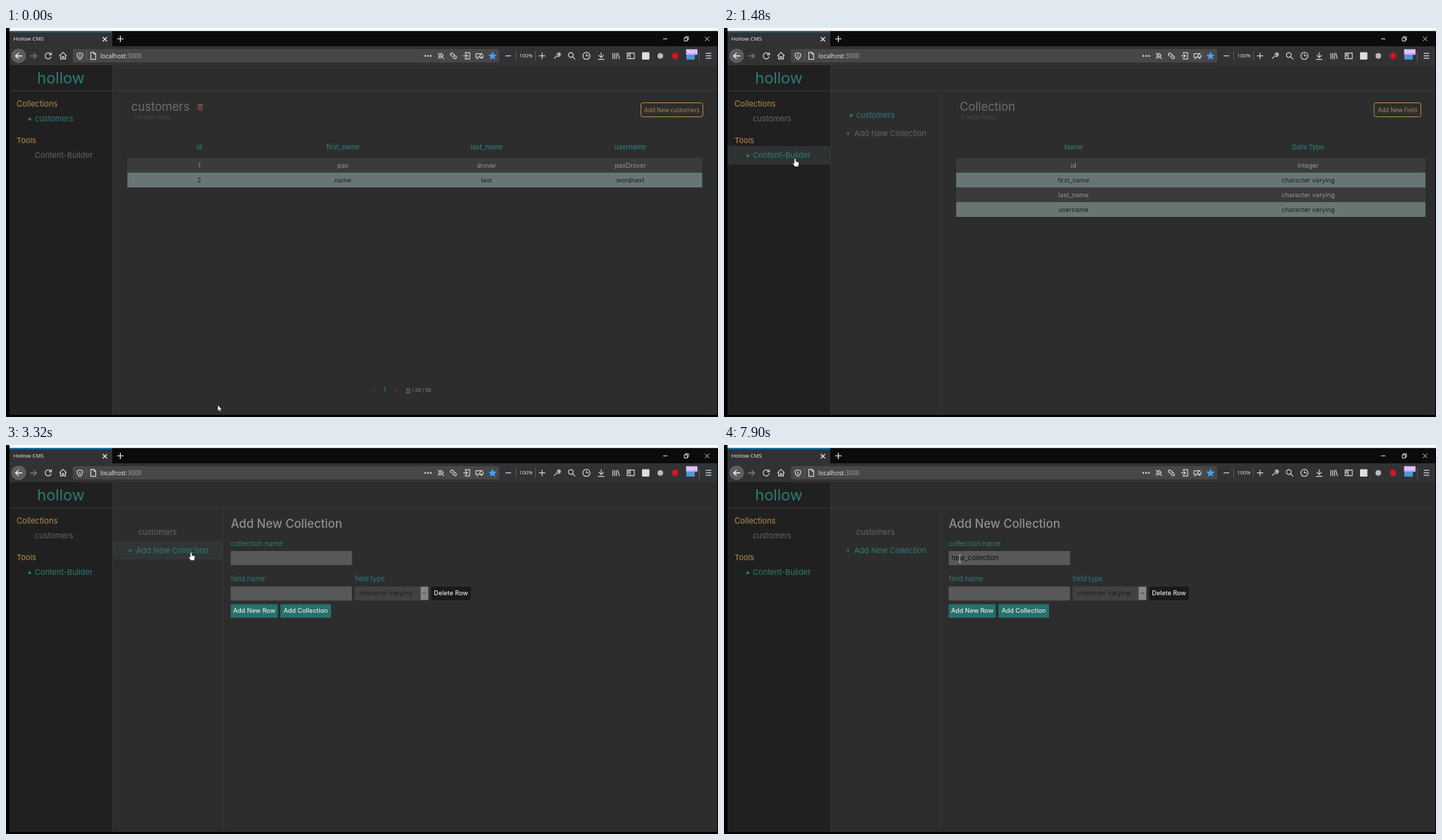
An HTML page with a canvas that plays this animation: 1012x554 px, repeating every 8000 ms.

```html
<!DOCTYPE html>
<html lang="en">
<head>
<meta charset="utf-8">
<title>Hollow CMS</title>
<style>
  html, body { margin: 0; height: 100%; overflow: hidden; background: #000; }
  canvas { display: block; }
</style>
</head>
<body>
<canvas id="stage" width="1012" height="554"></canvas>
<script>
const ctx = document.getElementById('stage').getContext('2d');
const LOOP = 8000;
const PAGE = 'Inter, sans-serif';
const CHROME = '"Open Sans", sans-serif';
const TEAL = '#2b7d75', ORANGE = '#b98a4c', GREY = '#616665', LINE = '#383838';

// time, x, y, hover strength
const cursorSteps = [
  [0, 301, 537], [210, 92, 129], [410, 97, 156], [500, 100, 172], [600, 102, 185],
  [1140, 101, 186], [1780, 104, 184], [1870, 118, 176], [1960, 140, 164],
  [2060, 168, 150, .1], [2150, 196, 138, .1], [2240, 220, 138, .1], [2340, 238, 143, .2],
  [2430, 249, 148, .4], [2540, 253, 140], [2660, 256, 139], [2970, 260, 148],
  [3040, 263, 153], [4130, 290, 157], [4190, 324, 160], [4250, 335, 162]
];
// time, number of typed letters
const NAME = 'new_collection';
const typingSteps = [
  [0, 0], [5120, 1], [5200, 2], [5280, 3], [5590, 4], [5920, 5], [6030, 6],
  [6180, 7], [6460, 8], [6580, 10], [6830, 11], [6940, 13], [7080, 14]
];
const BUILDER_AT = 1380, FORM_AT = 3320;

const stepAt = (steps, time) => steps.filter(step => step[0] <= time).pop();

function rect(x, y, w, h, color, radius = 0) {
  ctx.fillStyle = color;
  ctx.beginPath();
  ctx.roundRect(x, y, w, h, radius);
  ctx.fill();
}

function circle(x, y, r, color) {
  ctx.fillStyle = color;
  ctx.beginPath();
  ctx.arc(x, y, r, 0, Math.PI * 2);
  ctx.fill();
}

function text(str, x, y, size, color, { align = 'left', weight = 400, font = PAGE } = {}) {
  ctx.font = `${weight} ${size}px ${font}`;
  ctx.textAlign = align;
  ctx.textBaseline = 'middle';
  ctx.fillStyle = color;
  ctx.fillText(str, x, y);
}

const centered = (str, x, y, size, color, weight = 400, font = PAGE) =>
  text(str, x, y, size, color, { align: 'center', weight, font });

function shape(path, x, y, { stroke, fill, width = 1.2 }) {
  const outline = new Path2D(path);
  ctx.save();
  ctx.translate(x, y);
  ctx.lineJoin = 'round';
  if (fill) { ctx.fillStyle = fill; ctx.fill(outline); }
  if (stroke) { ctx.strokeStyle = stroke; ctx.lineWidth = width; ctx.stroke(outline); }
  ctx.restore();
}

const icon = (path, x, y = 39.7, stroke = '#d4d4d5', width = 1.2) => shape(path, x, y, { stroke, width });

const CROSS = 'M-3 -3L3 3M3 -3L-3 3';
const PLUS = 'M-4.5 0H4.5M0 -4.5V4.5';
const toolbarIcons = [
  [60, 'M3.5 -2.5A4.3 4.3 0 1 0 4.2 1M4.5 -5V-1.5H1'],
  [81, 'M-5 0L0 -5L5 0M-3.5 -1V4.5H-1V1H1V4.5H3.5V-1'],
  [105, 'M0 -4.5L4 -3Q4 3 0 5Q-4 3 -4 -3ZM0 -2V2.5'],
  [124, 'M-3.5 -5H1L3.5 -2.5V5H-3.5ZM1 -5V-2.5H3.5'],
  [618, 'M-3.5 -.5L.5 3.5M-1.5 1.5L-4 4M-2 -1L.5 -3.5L3.5 -.5L1 2M-4 -4L4.5 4.5'],
  [636, 'M-1 1L-4 -1Q-5 -4 -2 -4L1 -2Q2 0 0 1M1 -1L4 1Q5 4 2 4L-1 2'],
  [655, 'M-2 -2V-4.5H4V4.5H-2V2M-5 0H1M-1 -2L1 0L-1 2'],
  [673, 'M-5 -3H4M5 -2V2H1M-5 -3V2H-3M-4 5L4 -4M-1 1L4 4'],
  [714, 'M-4 0H4'],
  [762, PLUS],
  [783, 'M-4 4L1 -1M0 -2Q1 -5 4 -4L2 -2L3 -1L5 -3Q5 1 1 1'],
  [804, 'M2.2 -1.2A3.4 3.4 0 1 1 -4.6 -1.2A3.4 3.4 0 1 1 2.2 -1.2M1.2 1.2L5 5'],
  [825, 'M5 0A5 5 0 1 1 -5 0A5 5 0 1 1 5 0M0 -3V0H3'],
  [846, 'M0 -5V2M-3.5 -1L0 2.5L3.5 -1M-4.5 5H4.5'],
  [867, 'M-4.5 -4V4.5M-1.8 -4V4.5M.8 -4V4.5M2.5 -4L5 4.5'],
  [888, 'M-5 -4H5V4H-5ZM-1 -4V4M-4 -2H-2M-4 0H-2'],
  [998.5, 'M-4 -3.5H4M-4 0H4M-4 3.5H4']
];

function drawBrowser() {
  rect(0, 0, 1012, 554, '#000');
  rect(5, 0, 1007, 4.4, '#fff');
  rect(5, 4.4, 1006, 21.6, '#0b0b0c');
  rect(5, 26, 1006, 27, '#323234');
  rect(5, 5, 146, 21, '#323234');
  rect(5, 4.4, 146, 1.6, '#0a84c8');
  text('Hollow CMS', 10.5, 15.7, 7.8, '#f0f0f0', { font: CHROME });
  icon(CROSS, 140.5, 16, '#eee');
  icon(PLUS, 162.5, 15.5, '#eee');
  icon('M-3 0H3', 937, 15.5, '#ddd', 1);
  icon('M-3 -1.5H1.5V3H-3ZM-1.5 -1.5V-3H3V1.5H1.5', 967, 15.5, '#ddd', 1);
  icon(CROSS, 996.5, 15.5, '#ddd', 1);

  rect(95, 30, 606, 19, '#474749', 2);
  circle(18, 39.7, 10.4, '#5e5e60');
  icon('M5 0H-4M0 -4L-4.5 0L0 4', 18, 39.7, '#eee', 1.4);
  icon('M-5 0H4M0 -4L4.5 0L0 4', 39, 39.7, '#77777a', 1.4);
  for (const [x, path] of toolbarIcons) icon(path, x);
  for (const x of [114, 724, 752, 985]) rect(x, 33, 1, x === 985 ? 16 : 13, '#5a5a5c');
  for (const dx of [-4, 0, 4]) circle(600 + dx, 39.7, 1.3, '#d4d4d5');
  shape('M0 -6L1.7 -2L6 -1.7L2.7 1.2L3.7 5.3L0 3L-3.7 5.3L-2.7 1.2L-6 -1.7L-1.7 -2Z', 691.5, 39.7, { fill: '#45a1ff' });
  text('localhost', 134, 40.3, 8.7, '#f0f0f0', { font: CHROME });
  const hostWidth = ctx.measureText('localhost').width;
  text(':3000', 134 + hostWidth, 40.3, 8.7, '#a9a9ab', { font: CHROME });
  centered('100%', 739, 39.7, 7.5, '#e4e4e4', 400, CHROME);

  rect(904, 34.5, 10.5, 10.5, '#dededf', 1);
  circle(930, 39.7, 4, '#b9b9bb');
  circle(951, 39.7, 4.6, '#d3141f');
  rect(967, 36, 12, 9, '#4897dd');
  rect(966.5, 30, 16.5, 8.3, '#c3a2f4', 1);
  centered('9am', 974.7, 34, 7, '#fff', 600, CHROME);

  rect(5, 53, 146, 498, '#202020');
  rect(151, 53, 860, 498, '#2d2d2d');
}

function drawLink(label, x, y, active, dotted = true) {
  text(label, x, y, 11, active ? TEAL : GREY);
  if (active && dotted) circle(x - 7.3, y, 2.1, TEAL);
}

function hoveredRow(x, y, builder) {
  const within = (top, bottom) => y >= top && y < bottom;
  if (x < 151) {
    if (within(116, 142)) return [5, 116, 146, 26];
    if (within(168, 195)) return [5, 168, 146, 26.5];
  } else if (builder && x < 308) {
    if (within(111, 137)) return [152, 111, 156, 26];
    if (within(137, 163)) return [152, 137, 156, 26];
  }
  return null;
}

function drawSidebar(builder) {
  rect(5, 89, 1006, 1, LINE);
  rect(151, 53, 1, 498, '#343434');
  centered('hollow', 78, 72, 22, TEAL);
  text('Collections', 15, 108.6, 11.1, ORANGE);
  drawLink('customers', 41, 129.8, !builder);
  text('Tools', 15, 161, 11, ORANGE);
  drawLink('Content-Builder', 41, 182, builder);
}

function drawTable(left, width, head, rows) {
  const column = width / head.length;
  const center = index => left + column * (index + .5);
  head.forEach((label, i) => centered(label, center(i), 170, 9.4, TEAL, 500));
  rows.forEach((cells, r) => {
    const top = 185 + r * 21;
    rect(left, top, width, 21, r % 2 ? '#677674' : '#3b3b3b');
    cells.forEach((cell, i) => centered(cell, center(i), top + 11.3, 9.1, r % 2 ? '#1c1f1f' : '#929897'));
  });
}

function drawTitle(title, note, x) {
  text(title, x, 113, 16.7, '#6c706f');
  text(note, x + 2, 127.3, 7.6, '#484b4b');
}

function drawOutlineButton(label, left) {
  ctx.strokeStyle = ORANGE;
  ctx.lineWidth = 1;
  ctx.beginPath();
  ctx.roundRect(left, 106.5, 990.5 - left, 20, 3);
  ctx.stroke();
  centered(label, (left + 990.5) / 2, 117.5, 8.4, ORANGE, 400, CHROME);
}

function drawEntries() {
  drawTitle('customers', '2 entries found', 178);
  shape('M-3 -2.5H3L2.5 4H-2.5ZM-3.5 -3.5H3.5M-1 -4H1M-1 -1V2.5M1 -1V2.5', 276, 113, { stroke: '#a34d4d', width: 1 });
  drawOutlineButton('Add New customers', 902.5);
  drawTable(172.5, 817, ['id', 'first_name', 'last_name', 'username'], [
    ['1', 'pax', 'drover', 'paxDrover'],
    ['2', 'name', 'last', 'wordnext']
  ]);
  icon('M-2 -2.5V2.5M2 -2.5L-1 0L2 2.5', 523, 516, '#702070', 1);
  icon('M2 -2.5V2.5M-2 -2.5L1 0L-2 2.5', 552.5, 516, '#702070', 1);
  centered('1', 538, 515, 9, TEAL, 500);
  text('10 / 20 / 50', 568, 516, 6.8, '#8b8f8e');
  rect(568, 519, 6.5, .8, '#8b8f8e');
}

function drawFields() {
  drawTitle('Collection', '3 fields found', 335);
  drawOutlineButton('Add New Field', 924);
  drawTable(330, 667, ['Name', 'Data Type'], [
    ['id', 'integer'],
    ['first_name', 'character varying'],
    ['last_name', 'character varying'],
    ['username', 'character varying']
  ]);
}

function drawButton(label, left, top, width, color) {
  rect(left, top, width, 19.3, color, 1);
  centered(label, left + width / 2, top + 9.8, 9, '#e6e6e6', 500);
}

function drawForm(time) {
  text('Add New Collection', 319.5, 113, 16.8, '#8f8f8f', { weight: 500 });
  text('collection name', 319.5, 140.6, 9.9, TEAL);
  text('field name', 319.5, 191, 9.9, TEAL);
  text('field type', 495.5, 191, 9.7, TEAL);
  rect(319.3, 151, 172.5, 20, '#585858', 1);
  rect(319.3, 201.5, 172.5, 20, '#585858', 1);
  rect(495.5, 201.5, 94, 20, '#414141', 1);
  rect(589.3, 201.7, 11, 19, '#858585');
  icon('M-2.5 -1.2L0 1.2L2.5 -1.2', 594.7, 211.2, '#333', 1);
  text('character varying', 502, 211.5, 9.1, '#1f1f1f');
  drawButton('Delete Row', 604.5, 201.8, 56, '#191919');
  drawButton('Add New Row', 319.3, 226.7, 67, '#27706b');
  drawButton('Add Collection', 390, 226.7, 72, '#27706b');

  const typed = NAME.slice(0, stepAt(typingSteps, time)[1]);
  text(typed, 323.3, 161, 9.6, '#111');
  const typedWidth = ctx.measureText(typed).width;
  const blinkedOff = time >= 5780 && time < 5920;
  if (time >= 4800 && time < 7340 && !blinkedOff) rect(Math.round(323 + typedWidth), 155, 1, 13, '#000');
  if (time >= 7340 && time < 7900) rect(323, 205, 1, 13, '#000');
}

function drawBuilder(time) {
  const adding = time >= FORM_AT;
  rect(308, 90, 1, 461, '#363636');
  drawLink('customers', 188, 124.6, !adding);
  drawLink('Add New Collection', 185, 150.6, adding, false);
  icon('M-2.5 0H2.5M0 -2.5V2.5', 176.3, 150.2, adding ? TEAL : GREY, 1);
  if (adding) drawForm(time);
  else drawFields();
}

function drawCursor(x, y, onLink, inField) {
  if (inField) {
    icon('M-2 -5H2M0 -5V5M-2 5H2', x, y, '#b5b5b5', 1);
  } else if (onLink) {
    shape('M-1.2 .5Q0 -.8 1.2 .5V4L5 5Q6 5.5 5.5 8L4.5 11.5H-.5L-3.3 7.3Q-3 5.6 -1.2 7Z', x, y, { fill: '#fff', stroke: '#111', width: .6 });
  } else {
    shape('M0 0V8.5L2 6.8L3.3 9.6L4.6 9L3.4 6.3H6Z', x, y, { fill: '#fff', stroke: '#111', width: .5 });
  }
}

function draw(time) {
  const builder = time >= BUILDER_AT;
  const [, x, y, strength = 1] = stepAt(cursorSteps, time);
  const row = hoveredRow(x, y, builder);
  drawBrowser();
  if (row) {
    ctx.globalAlpha = strength;
    rect(...row, x < 151 ? '#2f3232' : '#323535');
    ctx.globalAlpha = 1;
  }
  drawSidebar(builder);
  if (builder) drawBuilder(time);
  else drawEntries();
  drawCursor(x, y, row, time >= FORM_AT && x > 319);
}

const start = performance.now();
function tick() {
  draw((performance.now() - start) % LOOP);
  requestAnimationFrame(tick);
}
tick();
</script>
</body>
</html>
```
